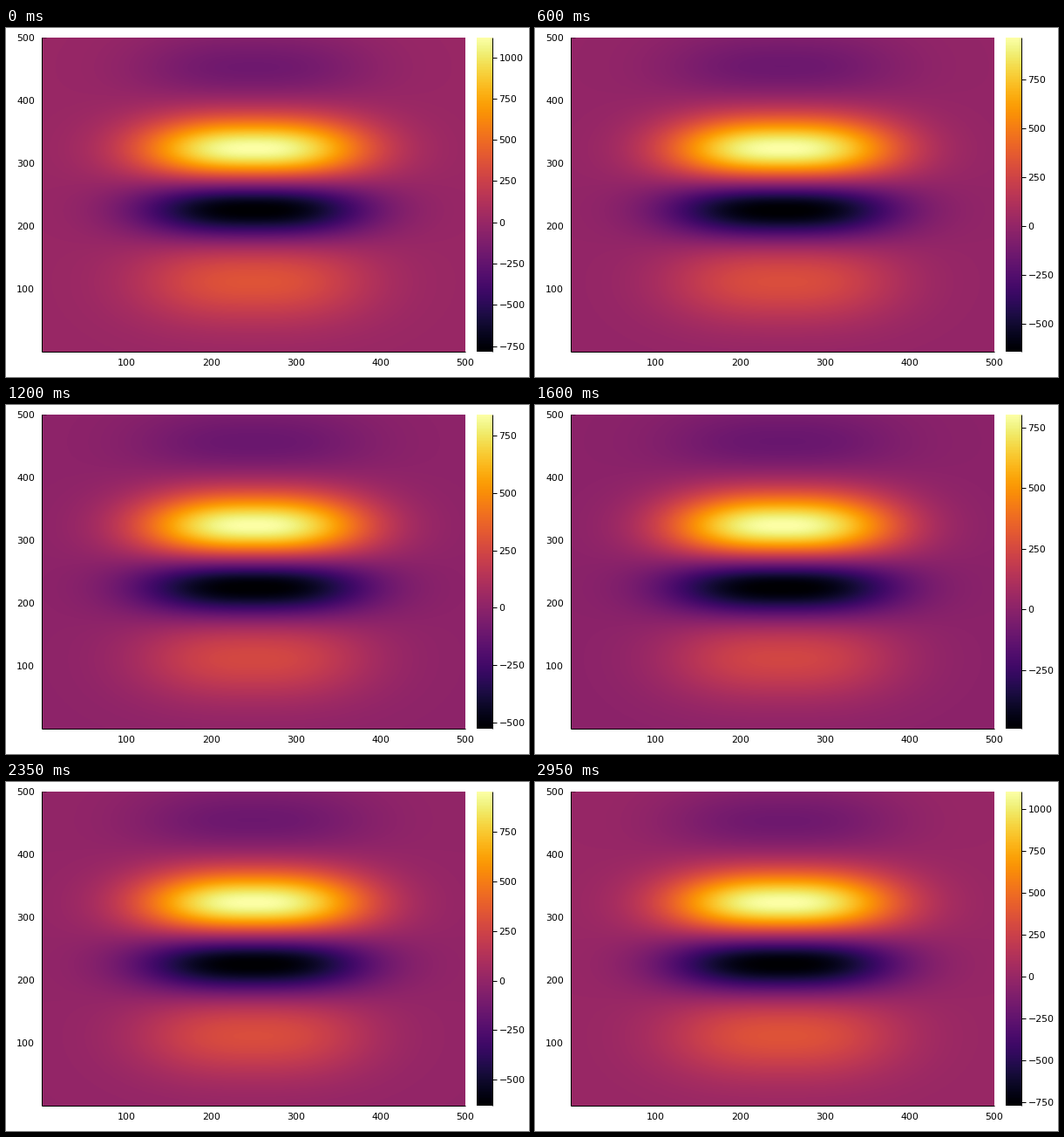
Animation, 600 px wide and 400 px high, one loop 3000 ms. Source, as a matplotlib script:

```python
import numpy as np
import matplotlib.pyplot as plt
from matplotlib.animation import FuncAnimation

W, H, DPI = 600, 400, 100
FRAMES, STEP = 60, 50
LEFT, RIGHT, TOP, BOTTOM = 41, 527, 11, 371
BAR_L, BAR_R = 540, 558
N = 500
TICKS = np.arange(-1000, 1251, 250)

plt.rcParams["font.family"] = "DejaVu Sans"
plt.rcParams["font.size"] = 11 * 72 / DPI

# Lobes along y: centre, width, amplitude
FADING = [(445, 43, -230), (323, 33, 860), (228, 33, -806), (112, 46, 360)]
STEADY = [(325, 62, 277), (228, 33, -88), (112, 46, 12)]

x = np.linspace(0.5, N + 0.5, RIGHT - LEFT)
y = np.linspace(0.5, N + 0.5, BOTTOM - TOP)
across = np.exp(-np.abs((x - 250.5) / 135) ** 2.6)


def profile(lobes):
    return sum(a * np.exp(-((y - c) / w) ** 2 / 2) for c, w, a in lobes)


fading, steady = profile(FADING), profile(STEADY)


def state(i):
    """Field and colour limits; the decay plays forward, then backward."""
    decay = np.exp(-min(i, FRAMES - i) / 60)
    field = np.outer(fading * decay + steady, across)
    return field, -6 - 777 * decay, 275 + 844 * decay


def px(v):
    return LEFT + (v - 0.5) / N * (RIGHT - LEFT)


def py(v):
    return BOTTOM - (v - 0.5) / N * (BOTTOM - TOP)


fig = plt.figure(figsize=(W / DPI, H / DPI), dpi=DPI, facecolor="white")
ax = fig.add_axes([0, 0, 1, 1])
ax.axis("off")


def line(xs, ys, **kw):
    return ax.plot(xs, ys, color="black", lw=0.72, solid_capstyle="butt",
                   zorder=2, **kw)[0]


def image(data, left, right):
    return ax.imshow(data, cmap="inferno", origin="lower", aspect="auto",
                     extent=(left, right, BOTTOM, TOP), zorder=1)


heat = image(np.zeros((len(y), len(x))), LEFT, RIGHT)
image(np.linspace(0, 1, 256)[:, None], BAR_L, BAR_R)
ax.set_xlim(0, W)
ax.set_ylim(H, 0)

line([LEFT, LEFT], [TOP, BOTTOM])
line([LEFT, RIGHT], [BOTTOM, BOTTOM])
line([LEFT, LEFT + 5], [TOP, TOP], alpha=0.4)
line([BAR_R, BAR_R], [TOP, BOTTOM])

for v in range(100, N + 1, 100):
    ax.text(px(v) + 0.5, 382.6, str(v), ha="center", va="center_baseline")
    ax.text(33, py(v), str(v), ha="right", va="center_baseline")

marks = [line([BAR_R, BAR_R + 5], [0, 0]) for _ in TICKS]
labels = [ax.text(565.4, 0, str(v).replace("-", "\u2212"), ha="left",
                  va="center_baseline") for v in TICKS]


def update(i):
    field, lo, hi = state(i)
    heat.set_data(field)
    heat.set_clim(lo, hi)
    for v, mark, label in zip(TICKS, marks, labels):
        pos = BOTTOM - (v - lo) / (hi - lo) * (BOTTOM - TOP)
        shown = lo <= v <= hi
        mark.set_ydata([pos, pos])
        label.set_y(pos)
        mark.set_visible(shown)
        label.set_visible(shown)
    return [heat, *marks, *labels]


anim = FuncAnimation(fig, update, frames=FRAMES, interval=STEP,
                     init_func=lambda: update(0), repeat=True, repeat_delay=0)
plt.show()
```
